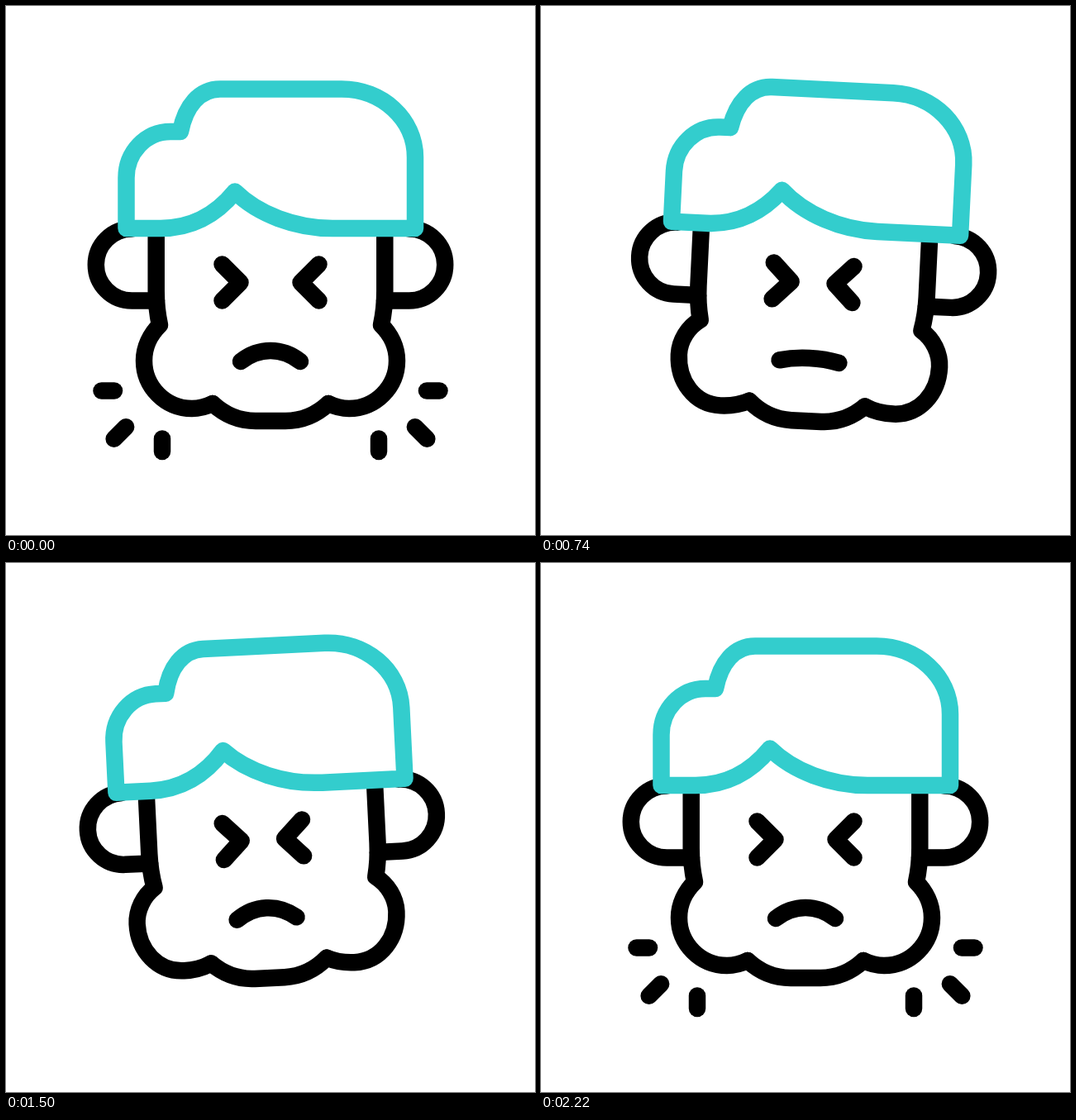
Animation of 640 by 640 pixels, one loop 2.4 s. Source, as an HTML page with a canvas:

```html
<!DOCTYPE html>
<html lang="en">
<head>
<meta charset="utf-8">
<title>Puffing face</title>
<style>
html, body { margin: 0; width: 100%; height: 100%; overflow: hidden; background: #fff; }
canvas { display: block; width: 100vmin; height: 100vmin; }
</style>
</head>
<body>
<canvas width="640" height="640"></canvas>
<script>
const ctx = document.querySelector('canvas').getContext('2d');
const LOOP = 2400;
const PIVOT_X = 320, PIVOT_Y = 521;

const hair = 'M145.5 269V208C145.5 177 169 152 199 152H211C217 121 234 100.5 259 100.5H406' +
  'C455 100.5 495 137 495 183V269H395C350 269 305 252 277 224.5C253 254 224 269 187 269Z';
const ear = 'M182 356.5H152.3a43.5 43.5 0 0 1 0 -87';
const chin = 'M250 481C264 494 282 502 302 502H338C358 502 376 494 390 481';

// Eased 0 to 1 between two times, in ms.
function ramp(t, from, to) {
  const k = Math.min(1, Math.max(0, (t - from) / (to - from)));
  return (1 - Math.cos(Math.PI * k)) / 2;
}

// Rises from a to b, holds, falls from c to d.
const pulse = (t, a, b, c, d) => ramp(t, a, b) - ramp(t, c, d);

function poseAt(t) {
  return {
    tilt: 2.8 * (pulse(t, 200, 760, 760, 1520) - pulse(t, 760, 1520, 1520, 2220)),
    squeeze: 10.3 * pulse(t, 200, 800, 1570, 2220),
    mouth: 13 - 9 * pulse(t, 200, 780, 960, 1540),
    puff: 4.8 * (pulse(t, 200, 660, 860, 1210) + pulse(t, 1210, 1600, 1740, 2220)),
    spark: 1 - pulse(t, 200, 520, 970, 1200) - pulse(t, 1210, 1480, 2040, 2220),
  };
}

function stroke(path, color = '#000') {
  ctx.strokeStyle = color;
  ctx.stroke(new Path2D(path));
}

// Side of the face running into the cheek, which bulges by p.
function cheek(p) {
  const left = 167 - p, low = 487 + 0.3 * p;
  return `M181.7 274V345Q181.7 366 186 386` +
    `C${174.7 - 0.7 * p} ${397 - 0.3 * p} ${left} 412.6 ${left} 429` +
    `C${left} 461 ${193 - 2 * p} ${low} ${225 - 2 * p} ${low}` +
    `C${234 - p} ${low} 242 484.8 250 481`;
}

// Three ticks fanned around the cheek, shrinking towards their outer ends.
function drawSparks(size) {
  if (size < 0.01) return;
  for (let i = 0; i < 3; i++) {
    const angle = Math.PI * (1 - i / 4), diagonal = i % 2;
    const outer = 73.5 + 9 * diagonal;
    const inner = outer - (15.5 + 5 * diagonal) * size;
    const point = r => `${189 + r * Math.cos(angle)} ${465.5 + r * Math.sin(angle)}`;
    stroke(`M${point(outer)}L${point(inner)}`);
  }
}

function drawHalf(pose) {
  stroke(ear);
  stroke(cheek(pose.puff));
  stroke(`M${261.5 + pose.squeeze} 312.5l22 22l-22 22`);
  drawSparks(pose.spark);
}

function draw(t) {
  const pose = poseAt(t);
  ctx.setTransform(1, 0, 0, 1, 0, 0);
  ctx.fillStyle = '#fff';
  ctx.fillRect(0, 0, 640, 640);
  ctx.lineWidth = 20.5;
  ctx.lineCap = ctx.lineJoin = 'round';

  ctx.translate(PIVOT_X, PIVOT_Y);
  ctx.rotate(pose.tilt * Math.PI / 180);
  ctx.translate(-PIVOT_X, -PIVOT_Y);

  drawHalf(pose);
  ctx.save();
  ctx.transform(-1, 0, 0, 1, 640, 0);
  drawHalf(pose);
  ctx.restore();

  const bend = 430 - pose.mouth * 4 / 3;
  stroke(chin);
  stroke(`M284 430C306 ${bend} 334 ${bend} 356 430`);
  stroke(hair, '#33cdcd');
}

const start = performance.now();
function frame() {
  draw((performance.now() - start) % LOOP);
  requestAnimationFrame(frame);
}
frame();
</script>
</body>
</html>
```
